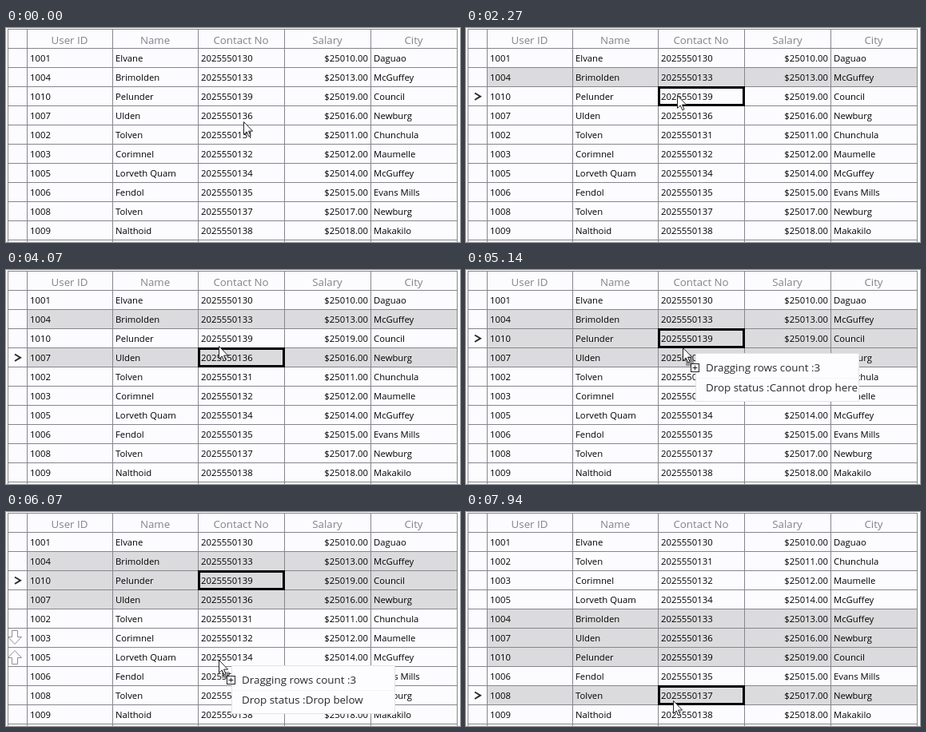
Recreate the animation shown at these times as an HTML page. Size 568x268 px, loop 8 s.

```html
<!DOCTYPE html>
<html lang="en">
<head>
<meta charset="utf-8">
<title>Row drag and drop</title>
<style>
  html, body { margin: 0; width: 100%; height: 100%; overflow: hidden; background: #fff; }
  svg { display: block; width: 100vw; height: 100vh; font-family: "Open Sans", "Noto Sans", sans-serif; }
  .cell { font-size: 11.3px; fill: #000; }
  .head { font-size: 13.3px; fill: #838388; text-anchor: middle; }
  .tip { font-size: 13.4px; fill: #2a2a2e; }
  .end { text-anchor: end; }
</style>
</head>
<body>
<svg id="stage" viewBox="0 0 568 268" xmlns="http://www.w3.org/2000/svg"></svg>
<script>
const LOOP = 8000, FPS = 15;
const TOP = 25, ROW = 24;
const COLS = [2, 26, 133, 240, 348, 456, 564];
const LINE = '#85858f', PAPER = '#fcfcff', PICKED = '#dbdbdd';

// Records in id order, 1001 onwards
const names = 'Elvane,Tolven,Corimnel,Brimolden,Lorveth Quam,Fendol,Ulden,Tolven,Nalthoid,Pelunder'.split(',');
const cities = 'Daguao,Chunchula,Maumelle,McGuffey,McGuffey,Evans Mills,Newburg,Newburg,Makakilo,Council'.split(',');

// The dragged records start below the first row and land in id order below record 5
const dragged = [4, 10, 7];
const others = names.map((_, i) => i + 1).filter(id => !dragged.includes(id));
const before = [others[0], ...dragged, ...others.slice(1)];
const landing = others.indexOf(5) + 1;
const after = [...others.slice(0, landing), ...dragged.slice().sort((a, b) => a - b), ...others.slice(landing)];

// Timeline in steps of 1/15 s
const DRAG = 74, DROP = 92, LAG = 2;
const clicks = [
  { at: 16, id: 4, pick: true },
  { at: 34, id: 10 },
  { at: 52, id: 7, pick: true },
  { at: 63, id: 10, pick: true },
  { at: 118, id: 8, pick: true }
];
const home = { x: 297, y: 117 };
const moves = [
  { from: 3, to: 5, x: 297, y: 117, bow: -8 },
  { from: 6, to: 14, x: 266, y: 61, bow: -8 },
  { from: 21, to: 24, x: 264, y: 77 },
  { from: 29, to: 42, x: 263, y: 97 },
  { from: 43, to: 46, x: 265, y: 105 },
  { from: 56, to: 67, x: 267, y: 82 },
  { from: 73, to: 77, x: 271, y: 97 },
  { from: 77, to: 85, x: 268, y: 135, bow: 20 },
  { from: 85, to: 91, x: 266, y: 185 },
  { from: 109, to: 114, x: 262, y: 219, bow: 11 },
  { from: 116, to: 119, x: 259, y: 236 }
];

const stage = document.getElementById('stage');

function add(parent, tag, attrs, text) {
  const el = document.createElementNS('http://www.w3.org/2000/svg', tag);
  for (const key in attrs) el.setAttribute(key, attrs[key]);
  if (text !== undefined) el.textContent = text;
  parent.appendChild(el);
  return el;
}
const label = (parent, cls, x, y, text) => add(parent, 'text', { class: cls, x, y }, text);
const move = (el, x, y) => el.setAttribute('transform', `translate(${x} ${y})`);
const show = (el, on) => el.setAttribute('visibility', on ? 'visible' : 'hidden');
const rowTop = i => TOP + ROW * i;

// Table
add(stage, 'rect', { x: 2, y: 1, width: 562, height: 267, fill: PAPER });
['User ID', 'Name', 'Contact No', 'Salary', 'City'].forEach((name, i) =>
  label(stage, 'head', (COLS[i + 1] + COLS[i + 2]) / 2, 20, name));

const rows = {};
names.forEach((name, n) => {
  const g = add(stage, 'g', {});
  const fill = add(g, 'rect', { x: 26, y: 0, width: 538, height: ROW, fill: PICKED });
  label(g, 'cell', 30, 17, 1001 + n);
  label(g, 'cell', 137, 17, name);
  label(g, 'cell', 244, 17, '202555013' + n);
  label(g, 'cell end', 453, 17, `$${25010 + n}.00`);
  label(g, 'cell', 460, 17, cities[n]);
  rows[n + 1] = { g, fill };
});

const grid = add(stage, 'g', { stroke: LINE, 'stroke-width': 1 });
for (const x of COLS) add(grid, 'path', { d: `M${x + .5} 1V268` });
for (let y = 1; y < 268; y += ROW) add(grid, 'path', { d: `M2 ${y + .5}H565` });

// Current row marker and cell frame
const current = add(stage, 'g', { fill: 'none' });
add(current, 'path', { d: 'M11 8.5L18 12.7L11 17', stroke: '#2c2c2c', 'stroke-width': 2 });
add(current, 'rect', { x: 241.5, y: 1.5, width: 106, height: 22, stroke: '#000', 'stroke-width': 3 });

// Drop position arrows
const arrows = add(stage, 'g', { fill: '#fff', stroke: '#909096' });
add(arrows, 'path', { d: 'M7.5 -20.5h7v8h5l-8.5 9l-8.5 -9h5z' });
add(arrows, 'path', { d: 'M7.5 21.5h7v-8h5l-8.5 -9l-8.5 9h5z' });

// Drag popup
const popup = add(stage, 'g', {});
add(popup, 'rect', { x: .5, y: .5, width: 204, height: 60, fill: '#fdfdff', stroke: '#e2e2e8' });
add(popup, 'path', { d: 'M1 31.5H204', stroke: '#ececf0', 'stroke-dasharray': '1 1' });
label(popup, 'tip', 13, 23, 'Dragging rows count :3');
const status = label(popup, 'tip', 13, 48, '');

// Pointer with its drag badge
const pointer = add(stage, 'g', {});
const badge = add(pointer, 'g', { fill: 'none', stroke: '#222' });
for (let y = 0; y < 8; y++)
  add(badge, 'path', { d: `M${4 + y % 2} ${15.5 + y}h9`, stroke: '#555', 'stroke-dasharray': '1 1' });
add(badge, 'rect', { x: 10.5, y: 20.5, width: 10, height: 10, fill: '#fff' });
add(badge, 'path', { d: 'M12.5 25.5h6M15.5 22.5v6' });
add(pointer, 'path', {
  d: 'M.5 .5V16.5L4.2 13L6.8 18.8L9 17.8L6.5 12.1H11.6Z',
  fill: '#fff', stroke: '#222', 'stroke-width': 1
});

// Eased moves from stop to stop; bow swings the way sideways
function pointerAt(step) {
  let { x, y } = home;
  for (const m of moves) {
    if (step <= m.from) break;
    const k = Math.min(1, (step - m.from) / (m.to - m.from));
    const ease = k * k * (3 - 2 * k);
    x += (m.x - x) * ease + (m.bow || 0) * Math.sin(Math.PI * k);
    y += (m.y - y) * ease;
  }
  return { x: Math.round(x), y: Math.round(y) };
}

function draw(time) {
  const step = Math.floor((time % LOOP + 4) * FPS / 1000);
  const order = step < DROP ? before : after;
  const done = clicks.filter(c => c.at <= step);

  order.forEach((id, i) => {
    move(rows[id].g, 0, rowTop(i));
    show(rows[id].fill, done.some(c => c.pick && c.id === id));
  });

  const last = done[done.length - 1];
  show(current, last);
  if (last) move(current, 0, rowTop(order.indexOf(last.id)));

  // The drop line nearest the pointer follows it with a short lag
  const dragging = step >= DRAG && step < DROP;
  const gap = Math.round((pointerAt(step - LAG).y - TOP) / ROW);
  const canDrop = gap > dragged.length;
  show(arrows, dragging && canDrop);
  move(arrows, 0, rowTop(gap));
  status.textContent = 'Drop status :' + (canDrop ? 'Drop below' : 'Cannot drop here');

  const { x, y } = pointerAt(step);
  move(pointer, x, y);
  move(popup, x + 16, y + 7);
  show(popup, dragging);
  show(badge, dragging);
}

const start = performance.now();
function tick() {
  draw(performance.now() - start);
  requestAnimationFrame(tick);
}
tick();
</script>
</body>
</html>
```
